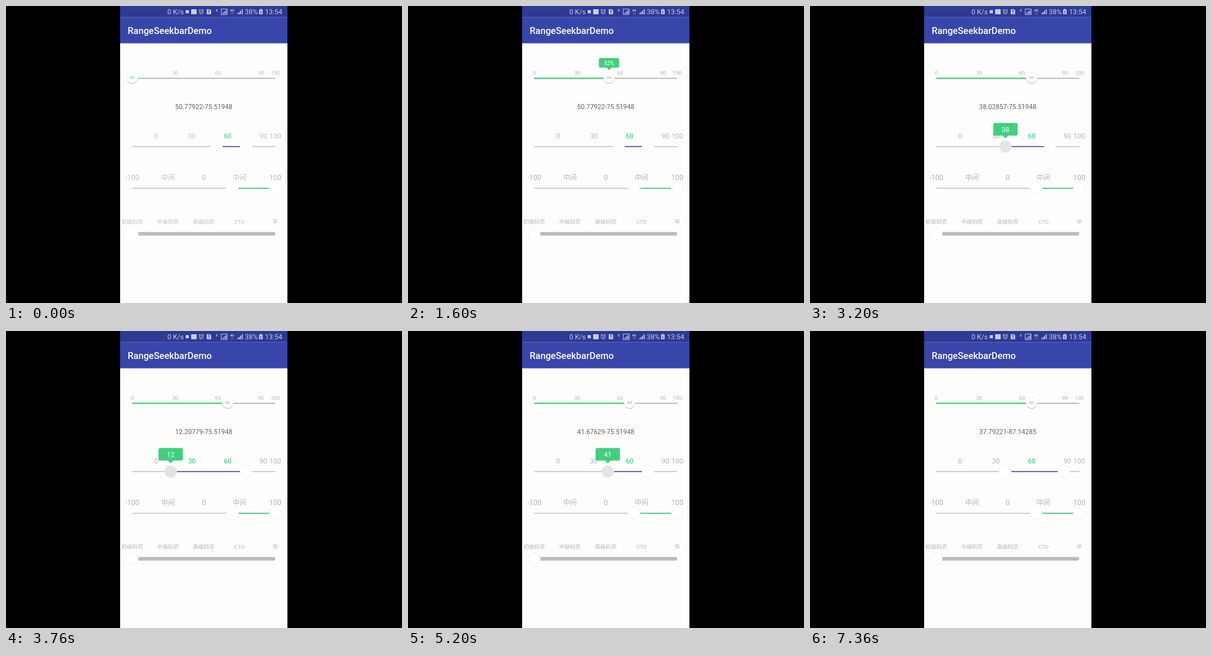
An HTML page for the animation above (8000 ms loop, 864 by 648 pixels).

```html
<!DOCTYPE html>
<html lang="zh">
<head>
<meta charset="utf-8">
<title>Range seekbar demo</title>
<style>
  html, body { margin: 0; width: 100%; height: 100%; overflow: hidden; background: #000; }
  svg { display: block; width: 864px; height: 648px; }
  text { font-family: Roboto, "Noto Sans CJK SC", "Noto Sans CJK", sans-serif; }
  .mid, .label { text-anchor: middle; }
  .label { fill: #b3b5b2; }
  .label.on { fill: #27c878; }
  .status text { fill: #c8cce8; font-size: 15.2px; }
  .status .tiny { font-size: 7px; font-weight: 700; }
  .ring { stroke: #eceeeb; stroke-width: 1; }
  .rough .ring { stroke: none; }
  .rough .zero { display: none; }
  .rough .label { opacity: .85; }
  .rough .marks { stroke: #3fcf95; }
  .marks { stroke: #999c99; stroke-width: 1.2; fill: none; }
</style>
</head>
<body>
<svg id="stage" viewBox="0 0 864 648">
  <rect width="864" height="648"/>
  <rect x="249" width="365" height="648" fill="#fdfefc"/>
  <rect x="249" width="365" height="24.5" fill="#2f3a95"/>
  <rect x="249" y="24.5" width="365" height="56.5" fill="#3846ac"/>
  <rect x="249" y="81" width="365" height="1" fill="#bfc3d6"/>
  <rect x="249" y="82" width="365" height="1.5" fill="#e9ebea"/>

  <g class="status" fill="#c8cce8">
    <text x="352" y="18">0 K/s</text>
    <rect x="392" y="9" width="7" height="7"/>
    <rect x="404" y="7" width="12" height="11"/>
    <g fill="none" stroke="#c8cce8" stroke-width="1.2">
      <circle cx="426" cy="13" r="4.3"/>
      <path d="M420.7 9.5l2.6-2.3M431.3 9.5l-2.6-2.3M424 13l1.5 1.5 2.5-2.5"/>
      <rect x="469.6" y="6.6" width="13" height="12"/>
    </g>
    <path d="M438 7h7l2.500 2.500V18H438z"/>
    <path d="M441 10.500l2-1.500v7" fill="none" stroke="#2f3a95" stroke-width="1.4"/>
    <text class="tiny" x="458" y="12">E</text>
    <path d="M472 17v-2h1.500v2zM474.500 17v-4h1.500v4zM477 17v-6h1.500v6zM479.500 17v-8h1.500v8z"/>
    <text class="tiny" x="489" y="12">4G</text>
    <path d="M492 18v-4M495.500 14v4" stroke="#8f97cc"/>
    <path d="M505 18v-3h2v3zM508 18v-5h2v5zM511 18v-8h2v8zM514.500 18V7h2v11z"/>
    <text x="521" y="18">38%</text>
    <path d="M552 8h2V6.500h4V8h2v10h-8z"/>
    <path d="M557 9l-3 4.500h4l-3 3.500" fill="none" stroke="#2f3a95"/>
    <text x="565" y="18">13:54</text>
  </g>
  <text x="265.500" y="60.500" font-size="20.150" font-weight="500" fill="#fff">RangeSeekbarDemo</text>
  <text id="value" class="mid" x="431.500" y="225" font-size="14.400" fill="#606361"></text>
</svg>
<script>
const NS = 'http://www.w3.org/2000/svg';
const stage = document.getElementById('stage');
const value = document.getElementById('value');
const START = 275.5, LENGTH = 312, GREEN = '#40d07c', GRAY = '#bbbeba';

function set(node, attrs) {
  for (const key in attrs) node.setAttribute(key, attrs[key]);
  return node;
}

function add(tag, attrs, parent = stage) {
  return parent.appendChild(set(document.createElementNS(NS, tag), attrs));
}

function label(text, x, cy, size) {
  const node = add('text', { class: 'label', x, y: cy + size * 0.355, 'font-size': size });
  node.textContent = text;
  return node;
}

function line(from, to, cy, height, fill, rx = 0) {
  return add('rect', { x: from, y: cy - height / 2, width: to - from, height, fill, rx });
}

function thumb(x, cy) {
  return add('circle', { class: 'ring', cx: x, cy, r: 13.2, fill: '#fff' });
}

function popup(w, top, h, arrow, size) {
  const g = add('g', {});
  const shape = (dy, fill, opacity) => {
    const part = add('g', { fill, opacity, transform: `translate(0 ${dy})` }, g);
    add('rect', { x: -w / 2, y: top, width: w, height: h, rx: 3.5 }, part);
    add('path', { d: `M${-arrow} ${top + h - .5}h${2 * arrow}l${-arrow} ${arrow}z` }, part);
  };
  shape(1.6, '#8fa398', .4);
  shape(0, GREEN, 1);
  const text = add('text', { class: 'mid', y: top + h / 2 + size * .41, 'font-size': size, fill: '#fff' }, g);
  return (x, content, visible) => {
    set(g, { transform: `translate(${x} 0)`, visibility: visible ? 'visible' : 'hidden' });
    text.textContent = content;
  };
}

// Percent slider
[0, 30, 60, 90, 100].forEach(n => {
  const node = label(n, START + LENGTH * n / 100, 145.5, 11.8);
  if (!n) node.classList.add('zero');
});
line(START, START + LENGTH, 157.8, 2.6, GRAY);
const fill1 = line(START, START, 157.8, 2.8, '#3bd878');
const knob = add('g', {});
add('circle', { cy: 157.8, r: 11.8, fill: '#a9adaa', opacity: .75 }, knob);
add('circle', { cy: 156.3, r: 11.8, fill: '#fff', stroke: '#e3e5e3', 'stroke-width': .6 }, knob);
add('path', { class: 'marks', d: 'M-3.500 153.500v5.500M0 153.500v5.500M3.500 153.500v5.500' }, knob);
const hint1 = popup(44, 113.5, 20.5, 6, 11.9);

// Two-thumb slider, -20 to 100
const toX = v => START + LENGTH * (v + 20) / 120;
const marks = [0, 30, 60, 90, 100].map(n => [n, label(n, toX(n), 283.8, 14.8)]);
line(START, START + LENGTH, 306.7, 1.8, GRAY);
const fill2 = line(START, START, 306.7, 2, '#3b49ae');
const leftThumb = thumb(0, 306.7), rightThumb = thumb(0, 306.7);
const hint2 = popup(53, 255.2, 27, 6.5, 14.7);

// Fixed sliders
['-100', '中间', '0', '中间', '100'].forEach((s, i) =>
  label(s, START + 78 * i, 374.2, s === '中间' ? 14.8 : 15.8));
line(START, START + LENGTH, 397.7, 1.8, GRAY);
line(493.5, 587.5, 397.7, 2.2, '#35d67e');
thumb(493.5, 397.7);
thumb(587.5, 397.7);
['初级码农', '中级码农', '高级码农', 'CTO', '卒'].forEach((s, i) =>
  label(s, START + 78 * i, 471.3, 11.7));
line(START, START + LENGTH, 497, 8, GRAY, 4);
thumb(START, 497);

const percentPath = [[880, 0], [1600, 52.25], [2000, 66.67]];
const leftPath = [[2560, 50.77922], [2640, 54.80519], [2880, 57.4], [3440, 23.5], [3680, 11.42857],
  [3760, 12.20779], [4320, 75.51948], [4640, 56.49351], [4880, 56.49351], [5200, 41.67629], [5280, 37.79221]];
const rightPath = [[5680, 75.51948], [5760, 77.07792], [5840, 74.8],
  [6160, 37.79221], [6400, 37.79221], [6880, 87.14285]];

function at(path, t) {
  const i = path.findIndex(p => p[0] > t);
  if (i < 0) return path[path.length - 1][1];
  if (i === 0) return path[0][1];
  const [t0, a] = path[i - 1], [t1, b] = path[i];
  return a + (b - a) * (t - t0) / (t1 - t0);
}

// Thumb tint: darkens on press, fades after release
function tint(t, down, up) {
  const k = t < up ? (t - down) / 160 : 1 - (t - up) / 300;
  const c = Math.round(255 - 27 * Math.max(0, Math.min(1, k)));
  return `rgb(${c},${c},${c})`;
}

function draw(t) {
  const percent = at(percentPath, t), x = START + LENGTH * percent / 100;
  stage.classList.toggle('rough', t < 400);
  fill1.setAttribute('width', x - START);
  set(knob, { transform: `translate(${x} 0)` });
  hint1(x, Math.floor(percent) + '%', t >= 960 && t < 2080);

  const left = at(leftPath, t), right = at(rightPath, t);
  const lx = toX(left), rx = toX(right);
  value.textContent = left.toFixed(5) + '-' + right.toFixed(5);
  marks.forEach(([n, node]) => node.classList.toggle('on', n >= left && n <= right));
  set(fill2, { x: lx, width: Math.max(0, rx - lx) });
  set(leftThumb, { cx: lx, fill: tint(t, 2640, 5360) });
  set(rightThumb, { cx: rx, fill: tint(t, 5680, 7040) });
  const onLeft = t >= 2640 && t < 5360, onRight = t >= 5680 && t < 7040;
  hint2(onRight ? rx : lx, Math.floor(onRight ? right : left), onLeft || onRight);
}

const begin = performance.now();
function tick() {
  const t = (performance.now() - begin) % 8000;
  draw(Math.floor(t / 80) * 80);
  requestAnimationFrame(tick);
}
tick();
</script>
</body>
</html>
```
